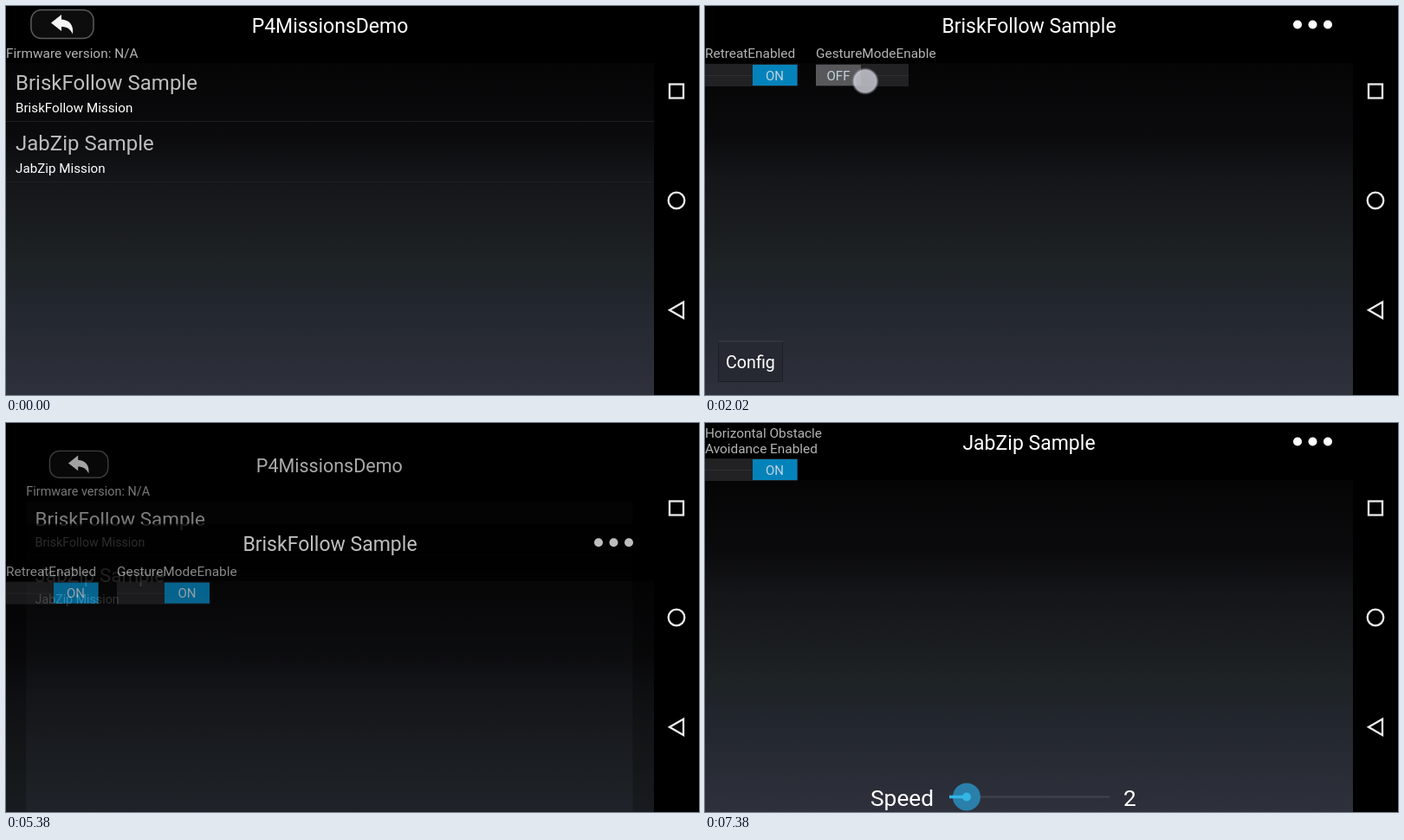
Write an HTML page that moves like this. It is 800 px wide and 450 px high and loops after 8 s.

```html
<!DOCTYPE html>
<html lang="en">
<head>
<meta charset="utf-8">
<title>Mission demo</title>
<style>
  html, body { margin: 0; width: 100%; height: 100%; overflow: hidden; background: #000; }
  svg { display: block; width: 100%; height: 100%; font-family: Roboto, sans-serif; }
  .title { font-size: 23px; fill: #fff; text-anchor: middle; }
  .name { font-size: 24px; fill: #bebebe; }
  .detail { font-size: 15.2px; fill: #fff; }
  .label { font-size: 15.4px; fill: #b4b4b4; }
  .state { font-size: 15px; fill: #c2d3dc; text-anchor: middle; }
  .speed { font-size: 26.3px; fill: #fff; }
  .nav { fill: none; stroke: #ebebeb; stroke-width: 2.3; }
</style>
</head>
<body>
<svg viewBox="0 0 800 450">
  <defs>
    <linearGradient id="dusk" x1="0" y1="0" x2="0" y2="1">
      <stop offset="0" stop-color="#050506"/>
      <stop offset=".22" stop-color="#0b0b0d"/>
      <stop offset=".34" stop-color="#141518"/>
      <stop offset=".5" stop-color="#1a1d20"/>
      <stop offset=".62" stop-color="#1e2326"/>
      <stop offset=".7" stop-color="#21252c"/>
      <stop offset="1" stop-color="#2e313c"/>
    </linearGradient>
    <radialGradient id="glow">
      <stop offset="0" stop-color="#c4c4cc" stop-opacity=".85"/>
      <stop offset=".68" stop-color="#c8c8d2" stop-opacity=".85"/>
      <stop offset=".8" stop-color="#e4e4f0" stop-opacity=".75"/>
      <stop offset="1" stop-color="#8888a0" stop-opacity="0"/>
    </radialGradient>
    <clipPath id="navArea"><rect x="748" width="52" height="450"/></clipPath>
    <g id="page">
      <rect width="748" height="450"/>
      <rect y="66" width="748" height="384" fill="url(#dusk)"/>
    </g>
    <g id="dots" fill="#fff">
      <circle cx="684" cy="21.5" r="5"/><circle cx="701.5" cy="21.5" r="5"/><circle cx="719" cy="21.5" r="5"/>
    </g>
    <g id="track">
      <rect width="107" height="26" fill="#222224"/>
      <path d="M0 13.5H107" stroke="#303033"/>
    </g>
    <g id="switchOn">
      <use href="#track"/>
      <rect x="55" y="1" width="51.5" height="24" fill="#0483bb"/>
      <text class="state" x="80.5" y="18.5">ON</text>
    </g>
  </defs>

  <g id="list">
    <use href="#page"/>
    <rect x="29" y="4.5" width="72" height="33" rx="12" fill="#0d0d0e" stroke="#5c5c5e" stroke-width="1.5"/>
    <path d="M52 19.5 64 10V15.5C73 16 78.5 22 77 32.5 74 26 70 24 64 24V29Z" fill="#f4f4f4"/>
    <text class="title" x="374" y="31">P4MissionsDemo</text>
    <text class="label" x="0" y="60">Firmware version: N/A</text>
    <text class="name" x="11" y="97">BriskFollow Sample</text>
    <text class="detail" x="11" y="123">BriskFollow Mission</text>
    <text class="name" x="11" y="167">JabZip Sample</text>
    <text class="detail" x="11" y="193">JabZip Mission</text>
    <path d="M0 133.5H748M0 203.5H748" stroke="#1f1f23"/>
  </g>

  <g id="follow">
    <use href="#page"/>
    <text class="title" x="374" y="31">BriskFollow Sample</text>
    <use href="#dots"/>
    <text class="label" x="0" y="60">RetreatEnabled</text>
    <text class="label" x="128" y="60">GestureModeEnable</text>
    <use href="#switchOn" y="67"/>
    <use href="#track" x="128" y="67"/>
    <g id="thumb">
      <rect id="thumbFace" x="128" y="68" width="52" height="24"/>
      <text id="thumbText" class="state" x="154" y="85.5"></text>
    </g>
    <rect x="15.5" y="388.5" width="74" height="46" rx="1" fill="#262932" stroke="#1c1e25"/>
    <path d="M16 388H90" stroke="#41444d"/>
    <text x="24" y="418.5" font-size="19.7" fill="#fff">Config</text>
  </g>

  <g id="fly">
    <use href="#page"/>
    <text class="title" x="374" y="31">JabZip Sample</text>
    <use href="#dots"/>
    <text class="label" x="0" y="16.5">Horizontal Obstacle</text>
    <text class="label" x="0" y="34.5">Avoidance Enabled</text>
    <use href="#switchOn" y="41"/>
    <text class="speed" x="191" y="443">Speed</text>
    <text class="speed" x="483" y="443">2</text>
    <path d="M282 432.5H467" stroke="#41444f" stroke-width="2"/>
    <circle cx="302" cy="432.5" r="16" fill="#2a80ab"/>
    <path d="M282 432.5H302" stroke="#33b5e5" stroke-width="3.5"/>
    <circle cx="302" cy="432.5" r="5" fill="#33b5e5"/>
  </g>

  <rect x="748" width="52" height="450"/>
  <circle id="ripple" cx="774" cy="351.5" r="33" fill="#3d3d3d" clip-path="url(#navArea)"/>
  <g class="nav">
    <rect x="766" y="90.5" width="16" height="16"/>
    <circle cx="774" cy="225" r="9.3"/>
    <path d="M766 351.8 782 342.5V361Z"/>
  </g>
  <circle id="touch" r="16" fill="url(#glow)"/>
</svg>

<script>
const LOOP = 8000, STEP = 80, PHASE = 20;
const OPEN_FOLLOW = 500, CLOSE_FOLLOW = 4900, OPEN_FLY = 6340;
const PIVOT_X = 364, PIVOT_Y = 225, DIM = .65;
const $ = id => document.getElementById(id);
const [list, follow, fly, thumb, thumbFace, thumbText, ripple, touch] =
  ['list', 'follow', 'fly', 'thumb', 'thumbFace', 'thumbText', 'ripple', 'touch'].map($);

const ramp = (from, to, t) => Math.min(1, Math.max(0, (t - from) / (to - from)));
const mix = (a, b, x) => a + (b - a) * x;
const smooth = x => x * x * (3 - 2 * x);
const easeOut = x => 1 - (1 - x) ** 2;

// start, hold and fade length, position
const taps = [
  [500, 320, 165, 330, 95],
  [2020, 240, 160, 185, 87],
  [3140, 160, 80, 712, 28],
  [3780, 160, 80, 712, 21],
  [4900, 160, 160, 783, 351],
  [6340, 320, 165, 330, 165]
];

function placeList(scale, drop, opacity) {
  const inset = 1 - scale;
  list.setAttribute('transform', `translate(${PIVOT_X * inset} ${PIVOT_Y * inset + drop}) scale(${scale})`);
  list.setAttribute('opacity', opacity);
}

function placeSheet(sheet, y, opacity) {
  sheet.setAttribute('transform', `translate(0 ${y})`);
  sheet.setAttribute('opacity', opacity);
}

function openSheet(sheet, u) {
  const scale = mix(1, .9, easeOut(ramp(400, 572, u)));
  placeList(scale, Math.max(0, u - 440) * .1075, mix(1, DIM, ramp(380, 480, u)));
  placeSheet(sheet, 450 * (1 - smooth(ramp(508, 800, u))), easeOut(ramp(505, 870, u)));
}

function closeSheet(sheet, u) {
  const back = easeOut(ramp(400, 800, u));
  placeList(mix(.9, 1, back), 21.5 * (1 - back), mix(DIM, 1, ramp(460, 860, u)));
  const fall = smooth(ramp(380, 680, u));
  placeSheet(sheet, 450 * fall, 1 - fall);
}

function drawTouch(t) {
  const tap = taps.find(([start, hold, fade]) => t >= start && t < start + hold + fade);
  touch.setAttribute('opacity', tap ? 1 - ramp(tap[0] + tap[1], tap[0] + tap[1] + tap[2], t) : 0);
  if (!tap) return;
  touch.setAttribute('cx', tap[3]);
  touch.setAttribute('cy', tap[4]);
}

function draw(time) {
  const t = Math.max(0, Math.floor((time - PHASE) / STEP) * STEP + PHASE);
  placeSheet(follow, 450, 0);
  placeSheet(fly, 450, 0);
  if (t < CLOSE_FOLLOW) openSheet(follow, t - OPEN_FOLLOW);
  else if (t < OPEN_FLY) closeSheet(follow, t - CLOSE_FOLLOW);
  else openSheet(fly, t - OPEN_FLY);

  const on = t >= 2180;
  thumb.setAttribute('transform', `translate(${55 * smooth(ramp(2140, 2420, t))} 0)`);
  thumbFace.setAttribute('fill', on ? '#0483bb' : '#58585b');
  thumbText.textContent = on ? 'ON' : 'OFF';

  ripple.setAttribute('opacity', t < CLOSE_FOLLOW ? 0 : 1 - ramp(5060, 5380, t));
  drawTouch(t);
}

const begin = performance.now();
function tick() {
  draw((performance.now() - begin) % LOOP);
  requestAnimationFrame(tick);
}
tick();
</script>
</body>
</html>
```
